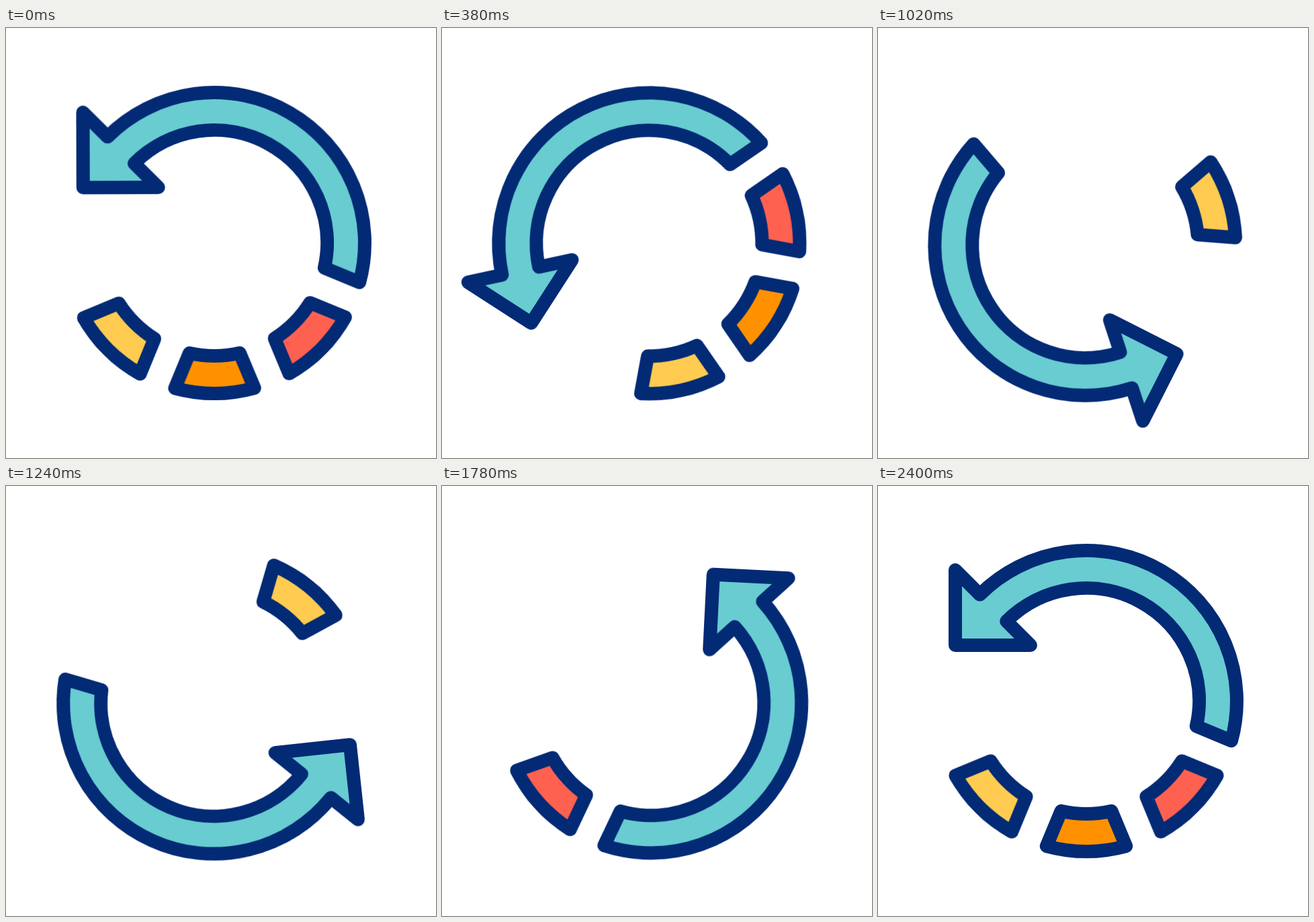
Animation of 640 by 640 pixels, one loop 2.42 s. Source, as an HTML page:

```html
<!DOCTYPE html>
<html lang="en">
<head>
<meta charset="utf-8">
<title>Rotating arrow</title>
<style>
  html, body { margin: 0; width: 100%; height: 100%; overflow: hidden; background: #fff; }
  svg { display: block; width: 100%; height: 100%; }

  .wheel {
    stroke: #032a75;
    stroke-width: 20;
    stroke-linejoin: round;
    transform-origin: 309.5px 321.7px;
    animation: spin 2420ms linear infinite;
  }
  .dash { animation: blink 2420ms step-end infinite; }
  .red { fill: #ff6150; animation-delay: -1900ms; }
  .orange { fill: #ff9100; animation-delay: -1535ms; }
  .yellow { fill: #ffcb50; animation-delay: -1175ms; }
  .arrow { fill: #68ccd1; }

  /* The turn ends 20 ms before the loop does */
  @keyframes spin {
    0% { transform: rotate(0deg); }
    99.1736%, 100% { transform: rotate(-360deg); }
  }
  @keyframes blink {
    0% { visibility: hidden; }
    45%, 100% { visibility: visible; }
  }
</style>
</head>
<body>
<svg viewBox="0 0 640 640">
  <defs>
    <path id="dash" d="M-59.2 216A224 224 0 0 0 59.2 216L37.5 163.8A168 168 0 0 1 -37.5 163.8Z"/>
  </defs>
  <g class="wheel">
    <g transform="translate(310 320)">
      <use class="dash red" href="#dash" transform="rotate(-45)"/>
      <use class="dash orange" href="#dash"/>
      <use class="dash yellow" href="#dash" transform="rotate(45)"/>
      <path class="arrow" d="M-195 -195V-83H-83L-118.8 -118.8A168 168 0 0 1 163.8 37.5L216 59.2A224 224 0 0 0 -158.4 -158.4Z"/>
    </g>
  </g>
</svg>
</body>
</html>
```
